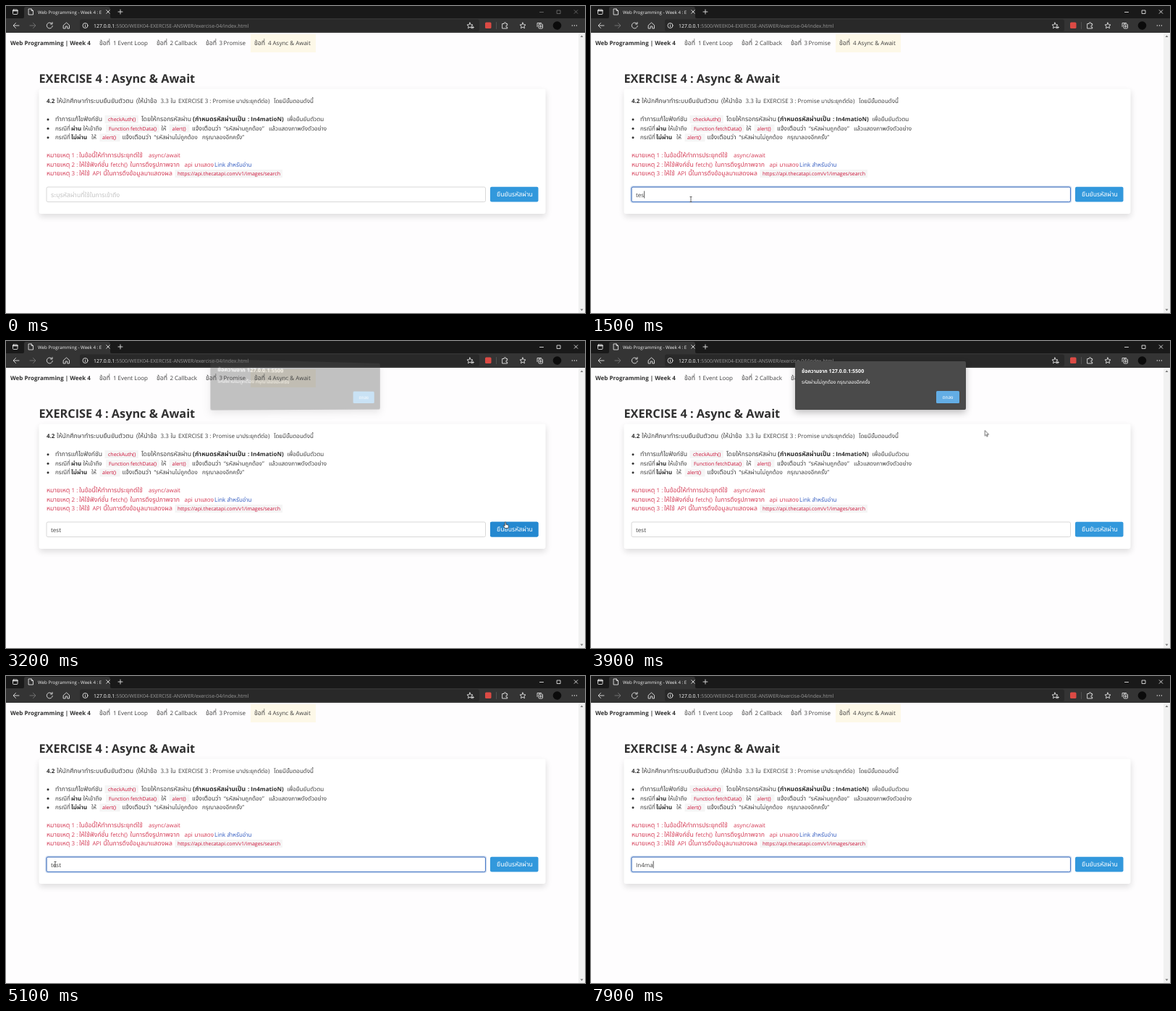
These frames come from a looping animation (800 px wide and 424 px high, 8 s). An HTML page:

```html
<!DOCTYPE html>
<html lang="th">
<head>
<meta charset="utf-8">
<title>Web Programming - Week 4</title>
<style>
html, body { margin: 0; width: 100%; height: 100%; overflow: hidden; background: #fefdfe; }
body { position: relative; font: 8px "Open Sans", "Noto Sans", "Noto Sans Thai", sans-serif; text-rendering: geometricPrecision; }
svg { position: absolute; left: 0; top: 0; display: block; }
text { fill: #404040; white-space: pre; }
.b { font-weight: 700; fill: #303030; }
.w { font-size: 8.7px; }
.code { font-size: 7px; fill: #cc1036; }
.red text { fill: #d43c56; }
.red .code { fill: #cc1036; }
.red .link { fill: #345cc0; }
.ico { fill: none; stroke: #e2e2e2; stroke-width: .9; stroke-linecap: round; stroke-linejoin: round; }
.menu text { font-size: 6px; fill: #f2f2f2; }

.step { animation: 8s step-end infinite; }
.idle { animation-name: idle; }
.focus { animation-name: focus; }
.hint { animation-name: hint; }
.menu { animation-name: menu; }
.word1 { animation-name: word1; }
.word2 { animation-name: word2; }
.type { animation-name: type; }
.caret { animation-name: caret; }
.sel { animation-name: sel; }
.hover { animation-name: hover; }
.beam { animation-name: beam; }
.hand { animation-name: hand; }
.arrow { animation-name: arrow; }
.mouse { animation: move 8s ease-in-out infinite; }
.shown { animation-name: shown; }

@keyframes idle { 0% { opacity: .6 } 7.5% { opacity: 0 } }
@keyframes focus { 0% { opacity: 0 } 7.5% { opacity: 1 } 38% { opacity: 0 } 63.75% { opacity: 1 } }
@keyframes hint { 0% { opacity: 1 } 13.75% { opacity: 0 } }
@keyframes menu { 0% { opacity: 0 } 8.75% { opacity: 1 } 13.75% { opacity: 0 } }
@keyframes word1 { 0% { opacity: 0 } 13.75% { opacity: 1 } 73.75% { opacity: 0 } }
@keyframes word2 { 0% { opacity: 0 } 73.75% { opacity: 1 } }
@keyframes sel { 0% { opacity: 0 } 66% { opacity: 1 } 73.75% { opacity: 0 } }
@keyframes caret {
  0% { opacity: 0 } 7.5% { opacity: 1 } 26% { opacity: 0 }
  73.75% { opacity: 1 } 86% { opacity: 0 } 90% { opacity: 1 }
}
@keyframes type {
  0% { transform: translateX(62px) }
  13.75% { transform: translateX(64.9px) }
  16.25% { transform: translateX(69.4px) }
  18.1% { transform: translateX(73.2px) }
  20% { transform: translateX(76.1px) }
  73.75% { transform: translateX(64.3px) }
  80% { transform: translateX(69.2px) }
  90% { transform: translateX(73.8px) }
  96.25% { transform: translateX(81.2px) }
  97.5% { transform: translateX(85.7px) }
}
@keyframes hover { 0% { opacity: 0 } 36.5% { opacity: 1 } 42% { opacity: 0 } }
@keyframes beam { 0% { opacity: 0 } 5.5% { opacity: 1 } 36% { opacity: 0 } 62.5% { opacity: 1 } }
@keyframes hand { 0% { opacity: 0 } 36.5% { opacity: 1 } 42% { opacity: 0 } }
@keyframes arrow { 0% { opacity: 1 } 5.5% { opacity: 0 } 36% { opacity: 1 } 36.5% { opacity: 0 } 42% { opacity: 1 } 62.5% { opacity: 0 } }
@keyframes shown { 0% { opacity: 0 } 1.5% { opacity: 1 } 73.75% { opacity: 0 } }
@keyframes move {
  0%, 1.5% { transform: translate(-20px, 200px) }
  7%, 28.75% { transform: translate(138px, 267px) }
  37%, 41% { transform: translate(690px, 250px) }
  53% { transform: translate(493px, 79px) }
  56% { transform: translate(493px, 79px); animation-timing-function: ease-in }
  57.5% { transform: translate(453px, 113px); animation-timing-function: ease-out }
  63%, 100% { transform: translate(68px, 260px) }
}

.alert {
  position: absolute; left: 282px; top: 28px; width: 236px; height: 67px; border-radius: 2px;
  background: #4a4a4a; box-shadow: 0 4px 10px rgba(0, 0, 0, .25); color: #fff;
  transform-origin: 50% 85%; animation: alert 8s linear infinite;
}
.alert > * { position: absolute; left: 9px; margin: 0; line-height: 12px; white-space: nowrap; }
.alert b { top: 8px; font-size: 7.1px; }
.alert p { top: 23px; font-size: 6.6px; }
.alert i { left: 195px; top: 41px; width: 32px; height: 17px; border-radius: 1.5px; background: #63ade5; font-style: normal; font-size: 6.4px; line-height: 17px; text-align: center; }
@keyframes alert {
  0%, 39.99% { opacity: 0; transform: translateX(6px) perspective(300px) rotateY(10deg) }
  40% { opacity: .34; transform: translateX(6px) perspective(300px) rotateY(8deg) }
  42.5%, 56.25% { opacity: 1; transform: translateX(0) perspective(300px) rotateY(0deg) }
  57.5% { opacity: .54; transform: translateX(6px) perspective(300px) rotateY(9deg) }
  58.75%, 100% { opacity: 0; transform: translateX(8px) perspective(300px) rotateY(14deg) }
}
</style>
</head>
<body>
<svg width="800" height="424" viewBox="0 0 800 424">
  <defs>
    <filter id="soft" x="-10%" y="-20%" width="120%" height="150%"><feGaussianBlur stdDeviation="4"/></filter>
    <path id="star" d="M0-4 1.2-1.3 4-1 1.9.9 2.5 3.7 0 2.2-2.5 3.7-1.9.9-4-1-1.2-1.3Z"/>
    <path id="x" d="M-2.3-2.3 2.3 2.3M2.3-2.3-2.3 2.3"/>
  </defs>

  <!-- browser bars -->
  <rect width="800" height="37" fill="#191919"/>
  <path d="M23 17q2 0 2-2V4q0-3 3-3h113q3 0 3 3v11q0 2 2 2H800v20H0V17Z" fill="#343434"/>
  <rect x="102" y="18.5" width="552" height="16.5" rx="2.5" fill="#292929"/>
  <g class="ico">
    <rect x="9.5" y="5" width="6.5" height="6.5" rx="1"/><path d="M9.5 6.5h6.5" stroke-width="1.5"/>
    <path d="M31.5 4h3.5l2.5 2.5V12h-6ZM35 4v2.5h2.5"/>
    <use href="#x" x="141" y="8"/>
    <path d="M155 8h6M158 5v6"/>
    <path d="M737.5 8.5h5M761.5 6h4.5v4.5h-4.5Z"/>
    <use href="#x" x="787.5" y="8"/>
    <path d="M18 27h-7.5M13.5 23.5 10 27l3.5 3.5"/>
    <path d="M33 27h7.5M37.5 23.5 41 27l-3.5 3.5" stroke="#777"/>
    <path d="M63.5 24.5A4 4 0 1 0 64.3 27.5M64 22.5v2.5h-2.5"/>
    <path d="M79.5 26.5 83.5 23l4 3.5V31h-2.7v-3h-2.6v3h-2.7Z"/>
    <circle cx="109.5" cy="27" r="3.5"/><path d="M109.5 26.7v2M109.5 25v.1"/>
    <use href="#star" x="641" y="27"/><path d="M643.5 29.5h3M645 28v3"/>
    <path d="M686 24.5h2.3a1.3 1.3 0 1 1 2.4 0h2v2.3a1.3 1.3 0 1 0 0 2.4v1.8h-6.7Z"/>
    <path d="M677.5 22.5v9" stroke="#555"/>
    <use href="#star" x="714" y="27"/>
    <rect x="736" y="25" width="5.5" height="6" rx="1"/><path d="M734 28.5v-5h5.5M737.3 28h3M738.8 26.5v3"/>
    <path d="M782.3 27h.1M785.3 27h.1M788.3 27h.1" stroke-width="1.3"/>
  </g>
  <rect x="662" y="22.5" width="8.5" height="8.5" rx="1.5" fill="#dc4a44"/>
  <circle cx="761.5" cy="27" r="5.8" fill="#0b0b0b"/>
  <text x="44" y="10.5" font-size="6.2" style="fill:#f0f0f0">Web Programming - Week 4 : E</text>
  <text x="121" y="29.5" font-size="6.95" style="fill:#9a9a9a"><tspan fill="#fff">127.0.0.1</tspan>:5500/WEEK04-EXERCISE-ANSWER/exercise-04/index.html</text>
  <rect class="step idle" x="730" width="70" height="16" fill="#191919"/>

  <!-- scroll bar -->
  <rect x="791" y="37" width="9" height="387" fill="#f1f1f1"/>
  <path d="M793.5 43 795.5 40.5l2 2.5ZM793.5 418.5l2 2.5 2-2.5Z" fill="#777"/>

  <!-- navigation -->
  <rect x="338" y="39" width="90" height="25" fill="#fdf8e8"/>
  <text class="b" x="6" y="54">Web Programming | Week 4</text>
  <text y="54"><tspan class="w" x="129">ข้อที่</tspan><tspan x="148">1</tspan><tspan x="154.5">Event Loop</tspan></text>
  <text y="54"><tspan class="w" x="208">ข้อที่</tspan><tspan x="226.5">2</tspan><tspan x="233">Callback</tspan></text>
  <text y="54"><tspan class="w" x="276">ข้อที่</tspan><tspan x="294.5">3</tspan><tspan x="300.5">Promise</tspan></text>
  <text y="54"><tspan class="w" x="343">ข้อที่</tspan><tspan x="362">4</tspan><tspan x="368.5">Async &amp; Await</tspan></text>

  <!-- card -->
  <text class="b" x="45.5" y="105.5" font-size="16.3">EXERCISE 4 : Async &amp; Await</text>
  <rect x="46" y="118" width="700" height="173" rx="3" fill="#0a0a0a" opacity=".13" filter="url(#soft)"/>
  <rect x="45.5" y="114.5" width="700" height="172.5" rx="3" fill="#fff"/>

  <text y="134.3"><tspan class="b" x="56">4.2</tspan><tspan class="w" x="70">ให้นักศึกษาทำระบบยืนยันตัวตน</tspan><tspan class="w" x="180">(ให้นำข้อ</tspan><tspan x="213.5">3.3</tspan><tspan x="227.5">ใน</tspan><tspan x="238">EXERCISE 3 : Promise</tspan><tspan x="318">มาประยุกต์ต่อ)</tspan><tspan x="370">โดยมีขั้นตอนดังนี้</tspan></text>

  <g fill="#333"><circle cx="58" cy="156.7" r="1.5"/><circle cx="58" cy="169.2" r="1.5"/><circle cx="58" cy="181.7" r="1.5"/></g>
  <g fill="#f5f5f5">
    <rect x="136.5" y="151" width="46.5" height="11"/>
    <rect x="138" y="163.7" width="73.5" height="11"/>
    <rect x="225.5" y="163.7" width="28" height="11"/>
    <rect x="129.5" y="176.3" width="28" height="11"/>
    <rect x="233.5" y="226" width="148.5" height="11"/>
  </g>
  <text y="159.3"><tspan class="w" x="68">ทำการแก้ไขฟังก์ชัน</tspan><tspan class="code" x="141">checkAuth()</tspan><tspan class="w" x="187">โดยให้กรอกรหัสผ่าน</tspan><tspan class="b w" x="258">(กำหนดรหัสผ่านเป็น</tspan><tspan class="b" x="334">: In4matioN)</tspan><tspan x="388.5">เพื่อยืนยันตัวตน</tspan></text>
  <text y="171.9"><tspan x="68">กรณีที่</tspan><tspan class="b" x="90">ผ่าน</tspan><tspan x="106.5">ให้เข้าถึง</tspan><tspan class="code" x="142">Function fetchData()</tspan><tspan x="214.5">ให้</tspan><tspan class="code" x="229.5">alert()</tspan><tspan class="w" x="257">แจ้งเตือนว่า</tspan><tspan x="301">“รหัสผ่านถูกต้อง”</tspan><tspan x="363">แล้วแสดงภาพดังตัวอย่าง</tspan></text>
  <text y="184.4"><tspan x="68">กรณีที่</tspan><tspan class="b" x="90">ไม่ผ่าน</tspan><tspan x="118">ให้</tspan><tspan class="code" x="133">alert()</tspan><tspan class="w" x="160.5">แจ้งเตือนว่า</tspan><tspan x="204.5">“รหัสผ่านไม่ถูกต้อง</tspan><tspan x="271">กรุณาลองอีกครั้ง”</tspan></text>

  <g class="red">
    <text y="209.2"><tspan class="w" x="56">หมายเหตุ</tspan><tspan x="90.5">1 :</tspan><tspan class="w" x="101">ในข้อนี้ให้ทำการประยุกต์ใช้</tspan><tspan x="197">async/await</tspan></text>
    <text y="221.7"><tspan class="w" x="56">หมายเหตุ</tspan><tspan x="90.5">2 :</tspan><tspan class="w" x="101">ให้ใช้ฟังก์ชั่น</tspan><tspan x="144.5">fetch()</tspan><tspan class="w" x="171.5">ในการดึงรูปภาพจาก</tspan><tspan x="246.5">api</tspan><tspan x="260.5">มาแสดง</tspan><tspan class="link" x="288">Link</tspan><tspan class="link" x="305.5">สำหรับอ่าน</tspan></text>
    <text y="234.2"><tspan class="w" x="56">หมายเหตุ</tspan><tspan x="90.5">3 :</tspan><tspan class="w" x="101">ให้ใช้</tspan><tspan x="119.5">API</tspan><tspan class="w" x="134.5">นี้ในการดึงข้อมูลมาแสดงผล</tspan><tspan class="code" x="237">https://api.thecatapi.com/v1/images/search</tspan></text>
  </g>

  <!-- form -->
  <rect x="56" y="250" width="606.5" height="20.5" rx="2" fill="#fff" stroke="#d8d8d8"/>
  <g class="step focus" fill="none" stroke="#4a7bc8">
    <rect x="55.5" y="249.5" width="607.5" height="21.5" rx="2.5" stroke-width="2.5" opacity=".25"/>
    <rect x="56" y="250" width="606.5" height="20.5" rx="2"/>
  </g>
  <text class="step word1" x="62" y="263.7">test</text>
  <text class="step word2" x="62" y="263.7">In4ma</text>
  <!-- the cover hides letters not typed yet -->
  <g class="step type">
    <rect y="253" width="30" height="15" fill="#fff"/>
    <path class="step caret" d="M.5 255.5v10" stroke="#333" stroke-width=".8"/>
  </g>
  <text class="step hint w" x="62" y="263.7" style="fill:#c4c4c4">ระบุรหัสผ่านที่ใช้ในการเข้าถึง</text>
  <g class="step sel">
    <rect x="62" y="255" width="14.2" height="11" fill="#2f74d0"/>
    <text x="62" y="263.7" style="fill:#fff">test</text>
  </g>

  <rect x="669" y="249.7" width="66.5" height="20.8" rx="2" fill="#3298dc"/>
  <rect class="step hover" x="669" y="249.7" width="66.5" height="20.8" rx="2" fill="#2488d0"/>
  <text class="w" x="678" y="263" font-weight="500" style="fill:#fff">ยืนยันรหัสผ่าน</text>

  <!-- saved entries -->
  <g class="step menu">
    <rect x="56" y="270.5" width="208.5" height="55.5" rx="2" fill="#4a4a4a" stroke="#3a3a3a" stroke-width=".8"/>
    <text x="64" y="281.5" style="font-size:5.4px;fill:#cfcfcf">ข้อมูลที่บันทึกไว้</text>
    <use href="#x" class="ico" x="256.5" y="279.5"/>
    <text x="62.5" y="299.6">mosslight</text>
    <text x="62.5" y="317.2">tinleaf</text>
  </g>
</svg>

<div class="alert"><b>ข้อความจาก 127.0.0.1:5500</b><p>รหัสผ่านไม่ถูกต้อง กรุณาลองอีกครั้ง</p><i>ตกลง</i></div>

<svg width="800" height="424" viewBox="0 0 800 424">
  <g class="step shown"><g class="mouse">
    <path class="step beam" d="M-1.5-3.5H1.5M0-3.5V3.5M-1.5 3.5H1.5" fill="none" stroke="#444" stroke-width=".8"/>
    <path class="step arrow" d="M0 0V7.5L1.7 6 2.8 8.5 4 8 2.9 5.5H5.3Z" fill="#fff" stroke="#333" stroke-width=".7"/>
    <path class="step hand" d="M-.8.5q.8-1.2 1.6 0V3.5l3 .7q.8.3.6 1.3L4 8.5H-.5L-2.8 5.5q-.2-1 .8-.8l1.2.8Z" fill="#fff" stroke="#222" stroke-width=".7"/>
  </g></g>
</svg>
</body>
</html>
```
